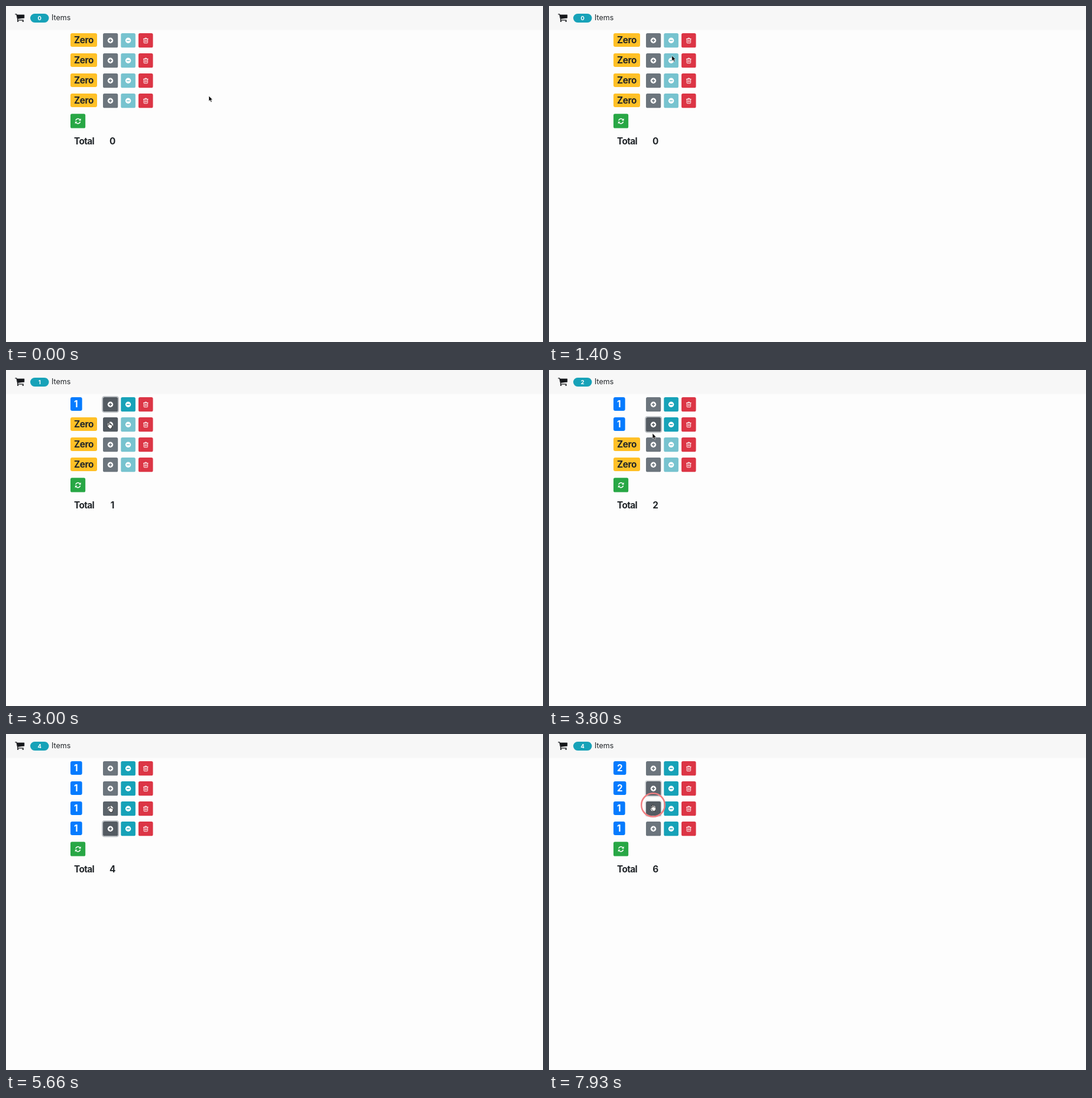
An HTML page for the animation above (8 s loop, 908x568 px).

```html
<!DOCTYPE html>
<html lang="en">
<head>
<meta charset="utf-8">
<title>Item counter</title>
<style>
  html, body { margin: 0; width: 100%; height: 100%; overflow: hidden; background: #fdfdfd; }
  svg { display: block; font-family: Inter, "Liberation Sans", sans-serif; }
  text { fill: #212529; }
  .big { font-size: 15.3px; font-weight: 700; letter-spacing: -.4px; }
  .pill { font-size: 9.5px; font-weight: 700; fill: #fff; }
  .mid { text-anchor: middle; }
</style>
</head>
<body>
<svg id="stage" width="908" height="568" viewBox="0 0 908 568">
  <defs>
    <g id="trash" fill="none" stroke="#fff" stroke-width=".95">
      <path d="M-4.3-2.9H4.3M-1.8-2.9l.6-1.4h2.4l.6 1.4M-3.2-2.9v6.3q0 .9.8.9h4.8q.8 0 .8-.9v-6.3"/>
      <path d="M-1.4-1.2v3.9M0-1.2v3.9M1.4-1.2v3.9" stroke-width=".7"/>
    </g>
    <g id="turn">
      <path d="M-3.9-.9A4 4 0 0 1 2.9-2.8" fill="none" stroke="#fff" stroke-width="1.5"/>
      <path d="M4.9-4.7V-.9H1.1z" fill="#fff"/>
    </g>
  </defs>
  <rect width="908" height="40.5" fill="#f7f7f7"/>
  <g transform="translate(14.6 10.9) scale(.0096)" fill="#16181b" stroke="#16181b" stroke-linecap="round" stroke-linejoin="round">
    <path d="M128 320H340L540 1230L500 1344H1536" fill="none" stroke-width="128"/>
    <path d="M420 420H1690V970L550 1105z" stroke-width="74"/>
    <circle cx="576" cy="1536" r="128" stroke="none"/>
    <circle cx="1472" cy="1536" r="128" stroke="none"/>
  </g>
  <rect x="41" y="13" width="31.5" height="15" rx="7.5" fill="#17a2b8"/>
  <text id="kinds" class="pill mid" x="56.8" y="24.2">0</text>
  <text x="77" y="24.4" font-size="12.5">Items</text>
  <g id="rows"></g>
  <rect x="109" y="182.3" width="25.2" height="24.3" rx="2.6" fill="#28a745"/>
  <g transform="translate(121.7 194.6)"><use href="#turn"/><use href="#turn" transform="rotate(180)"/></g>
  <text class="big" x="115" y="233.6" style="letter-spacing:-.6px">Total</text>
  <text id="total" class="big mid" x="179.9" y="233.6">0</text>
  <circle id="ring" r="19.8" fill="none" stroke="#f07f82" stroke-width="2.5"/>
  <g id="pointer">
    <path id="arrow" d="M0 0V9L2.1 7.1L3.5 10.4L5.1 9.7L3.7 6.6H6.4z" fill="#000" stroke="#fff" stroke-width=".6"/>
    <path id="hand" d="M-1.6 4.6V.2a.9.9 0 0 1 1.8 0V3.2q1.3-.4 1.7.4q1.3-.3 1.6.5q1.3 0 1.3 1.2q0 2.4-1.2 3.6v1.4h-4.4v-1l-3-3.6q-.6-1.2.5-1.3z"
      fill="#fff" stroke="#111" stroke-width=".85" stroke-linejoin="round"/>
  </g>
</svg>
<script>
const LOOP = 8000, TOP = 46, PITCH = 34, BTN_H = 24.3, FADE = 150, LAG = 120, RING = 260;
const $ = id => document.getElementById(id);

// time, x, y of the pointer
const path = [
  [0, 343, 152], [1020, 343, 152], [1400, 208, 84], [1750, 181, 63],
  [2100, 174, 57], [2380, 174, 57], [3080, 175, 90], [3400, 175, 90],
  [3800, 175, 107], [4180, 176, 122], [4450, 176, 122], [4860, 177, 153],
  [5050, 177, 155], [5350, 177, 155], [6150, 175, 57], [6480, 175, 57],
  [6660, 175, 65], [7010, 175, 88], [7280, 175, 88], [7820, 176, 120], [8000, 176, 120]
];
// time, row of each press
const presses = [[2170, 0], [3180, 1], [4260, 2], [5140, 3], [6300, 0], [7120, 1], [7885, 2]];

function slope(i, k) {
  const a = path[i - 1], b = path[i], c = path[i + 1];
  if (!a || !c) return 0;
  if ((b[k] - a[k]) * (c[k] - b[k]) <= 0) return 0;
  return (c[k] - a[k]) / (c[0] - a[0]);
}

function place(t) {
  let i = 0;
  while (i < path.length - 2 && path[i + 1][0] <= t) i++;
  const a = path[i], b = path[i + 1], d = b[0] - a[0];
  const u = Math.max(0, Math.min(1, (t - a[0]) / d)), v = 1 - u;
  return [1, 2].map(k =>
    v * v * (1 + 2 * u) * a[k] + u * u * (3 - 2 * u) * b[k] +
    d * u * v * (v * slope(i, k) - u * slope(i + 1, k)));
}

function hovered(t) {
  const [x, y] = place(t), r = Math.floor((y - TOP) / PITCH);
  return x > 164 && x < 189 && r >= 0 && r < 4 && y - TOP - r * PITCH < BTN_H ? r : -1;
}

function focused(t) {
  const last = presses.filter(p => p[0] <= t).pop();
  return last ? last[1] : -1;
}

// share of the last FADE ms in which test holds: a linear transition
function eased(test, t) {
  let n = 0;
  for (let k = 0; k < 10; k++) if (test(t - k * FADE / 10)) n++;
  return n / 10;
}

const mix = (a, b, u) => `rgb(${a.map((v, i) => Math.round(v + (b[i] - v) * u))})`;
const GREY = [108, 117, 125], DARK = [84, 91, 98];

const disc = (x, d, cls) =>
  `<circle cx="${x}" cy="58.3" r="4.7" fill="#fff"/>
   <path class="${cls}" d="M${x - 2.6} 58.3h5.2${d}" stroke-width="1.5"/>`;
const box = (x, w, cls, fill) =>
  `<rect class="${cls}" x="${x}" y="${TOP}" width="${w}" height="${BTN_H}" rx="2.6" fill="${fill}"/>`;

const rows = [0, 1, 2, 3].map(i => {
  const g = document.createElementNS('http://www.w3.org/2000/svg', 'g');
  g.setAttribute('transform', `translate(0 ${i * PITCH})`);
  g.innerHTML =
    `<rect class="tag" x="109" y="46" height="23" rx="3"/>
     <text class="big count" x="115" y="63.4"></text>
     <rect class="glow" x="163" y="45" width="27.2" height="26.3" rx="3.4" fill="none" stroke="#bfc3c7" stroke-width="2"/>
     ${box(164, 25.2, 'plus', '#6c757d')}
     ${disc(176.5, 'm-2.6-2.6v5.2', 'plusmark')}
     ${box(194.3, 24.6, 'minus', '#17a2b8')}
     ${disc(206.6, '', 'minusmark')}
     ${box(224, 24.5, 'bin', '#dc3545')}
     <use href="#trash" x="236.3" y="58.4"/>`;
  $('rows').append(g);
  return name => g.querySelector('.' + name);
});

function set(el, attrs) {
  for (const k in attrs) el.setAttribute(k, attrs[k]);
}

function draw(t) {
  const counts = [0, 0, 0, 0];
  for (const [at, r] of presses) if (t >= at + LAG) counts[r]++;

  rows.forEach((part, i) => {
    const n = counts[i];
    const glow = eased(s => focused(s) === i, t);
    const dark = eased(s => focused(s) === i || hovered(s) === i, t);
    const grey = mix(GREY, DARK, dark), teal = n ? '#17a2b8' : '#77c3cf';
    set(part('tag'), { width: n === 0 ? 45 : n === 1 ? 19.7 : 21.5, fill: n ? '#057bfe' : '#ffc027' });
    part('count').textContent = n || 'Zero';
    part('count').style.fill = n ? '#fff' : '#212529';
    set(part('glow'), { opacity: glow });
    set(part('plus'), { fill: grey });
    set(part('plusmark'), { stroke: grey });
    set(part('minus'), { fill: teal });
    set(part('minusmark'), { stroke: teal });
  });

  $('kinds').textContent = counts.filter(Boolean).length;
  $('total').textContent = counts.reduce((a, b) => a + b);

  const [x, y] = place(t), at = `translate(${x.toFixed(2)} ${y.toFixed(2)})`;
  const over = hovered(t) >= 0;
  set($('pointer'), { transform: at });
  set($('arrow'), { opacity: over ? 0 : 1 });
  set($('hand'), { opacity: over ? 1 : 0 });

  const press = presses.find(p => t >= p[0] && t < p[0] + RING);
  const age = press ? t - press[0] : RING;
  set($('ring'), { transform: at, opacity: Math.min(1, (RING - age) / 100) });
}

const start = performance.now();
function tick() {
  draw((performance.now() - start) % LOOP);
  requestAnimationFrame(tick);
}
draw(0);
requestAnimationFrame(tick);
</script>
</body>
</html>
```
